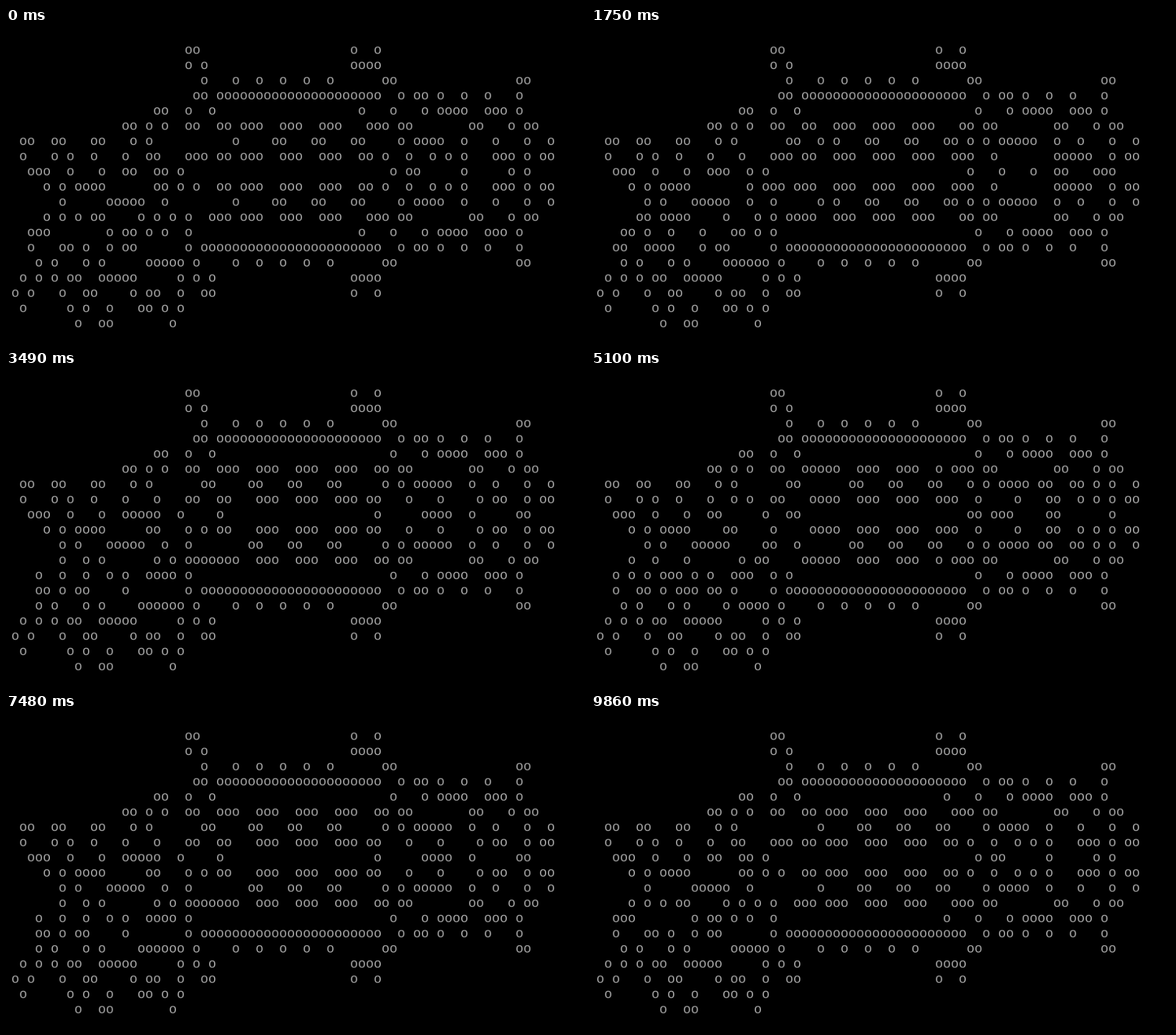
An HTML page with a canvas for the animation above (9890 ms loop, 1015 px wide and 552 px high).

```html
<!DOCTYPE html>
<html lang="en">
<head>
<meta charset="utf-8">
<title>Game of Life, period 5</title>
<style>
  html, body { margin: 0; width: 100%; height: 100%; overflow: hidden; background: #000; }
  canvas { display: block; width: 100%; height: 100%; }
</style>
</head>
<body>
<canvas id="screen" width="1029" height="560"></canvas>
<script>
const PERIOD = 5, LOOP = 9890, COLUMNS = 69, ROWS = 19, AXIS = 8;
const LINE_HEIGHT = 27, ORIGIN = { x: 9.5, y: 46 };

const seed = Array.from({ length: ROWS }, () => Array(COLUMNS).fill(0));

function stamp(x, y, drawing, mirrored = false) {
  drawing.trim().split('\n').forEach((row, dy) => [...row].forEach((mark, dx) => {
    if (mark !== 'o') return;
    seed[y + dy][x + dx] = 1;
    if (mirrored) seed[2 * AXIS - y - dy][x + dx] = 1;
  }));
}

// The turn on the left, where signals come back to the wire.
stamp(0, 0, `
......................oo
......................o.o
........................o
.......................oo
..................oo..o..o
..............oo.o.o..oo..oo
.oo..oo...oo...o.o..........o
.o...o.o..o...o..oo...ooo.oo
..ooo..o...o..oo..oo.o
....o.o.oooo......oo.o.o..oo
......o.....ooooo..o........o
....o.o.o.oo....o.o.o.o..ooo
..ooo.......o.oo.o.o..o
..o...oo.o..o.oo......o.oo
...o.o...o.o.....ooooo.o
.o.o.o.oo..ooooo.....o.o.o
o.o...o..oo....o.oo..o..oo
.o.....o.o..o...oo.o.o
........o..oo.......o
`);

// The wire: two long walls with studs, and a signal every five cells.
stamp(26, 3, 'o'.repeat(21), true);
for (let i = 0; i < 5; i++) stamp(28 + 3 * i, 2, 'o', true);
for (let i = 0; i < 3; i++) stamp(29 + 5 * i, 5, 'ooo\n....oo\nooo', true);

// The turn on the right, symmetric about the axis.
stamp(43, 0, `
o..o
oooo
....oo...............oo
......o.oo.o..o..o...o
.o...o...o.oooo..ooo.o
..ooo.oo.......oo...o.oo
......o.oooo..o...o...o..o
.oo.o..o..o.o.o...ooo.o.oo
.....o.oo.....o.....o.o
`, true);

function neighbours(grid, x, y) {
  let sum = -grid[y][x];
  for (let dy = -1; dy <= 1; dy++)
    for (let dx = -1; dx <= 1; dx++) sum += grid[y + dy]?.[x + dx] ?? 0;
  return sum;
}

const evolve = grid => grid.map((row, y) => row.map((alive, x) => {
  const n = neighbours(grid, x, y);
  return n === 3 || (alive && n === 2) ? 1 : 0;
}));

const phases = [seed];
while (phases.length < PERIOD) phases.push(evolve(phases.at(-1)));

// Key points of the slightly uneven tempo: [time in ms, generation].
const tempo = [[0, 0], [1750, 9], [3490, 18], [5100, 26], [6470, 33], [8280, 42], [9860, 50], [LOOP, 50]];

function generationAt(time) {
  const next = tempo.findIndex(([start]) => start > time);
  const [t0, g0] = tempo[next - 1], [t1, g1] = tempo[next];
  return Math.floor(g0 + (g1 - g0) * (time - t0) / (t1 - t0));
}

const canvas = document.getElementById('screen');
const ctx = canvas.getContext('2d');
let shown = -1;

function show(grid) {
  ctx.fillStyle = '#000';
  ctx.fillRect(0, 0, canvas.width, canvas.height);
  ctx.fillStyle = '#aaa';
  ctx.font = '23.33px "Liberation Mono", monospace';
  grid.forEach((row, y) => {
    const line = row.map(cell => cell ? 'o' : ' ').join('');
    ctx.fillText(line, ORIGIN.x, ORIGIN.y + y * LINE_HEIGHT);
  });
}

function draw() {
  const phase = generationAt(performance.now() % LOOP) % PERIOD;
  if (phase !== shown) show(phases[shown = phase]);
  requestAnimationFrame(draw);
}
draw();
</script>
</body>
</html>
```
